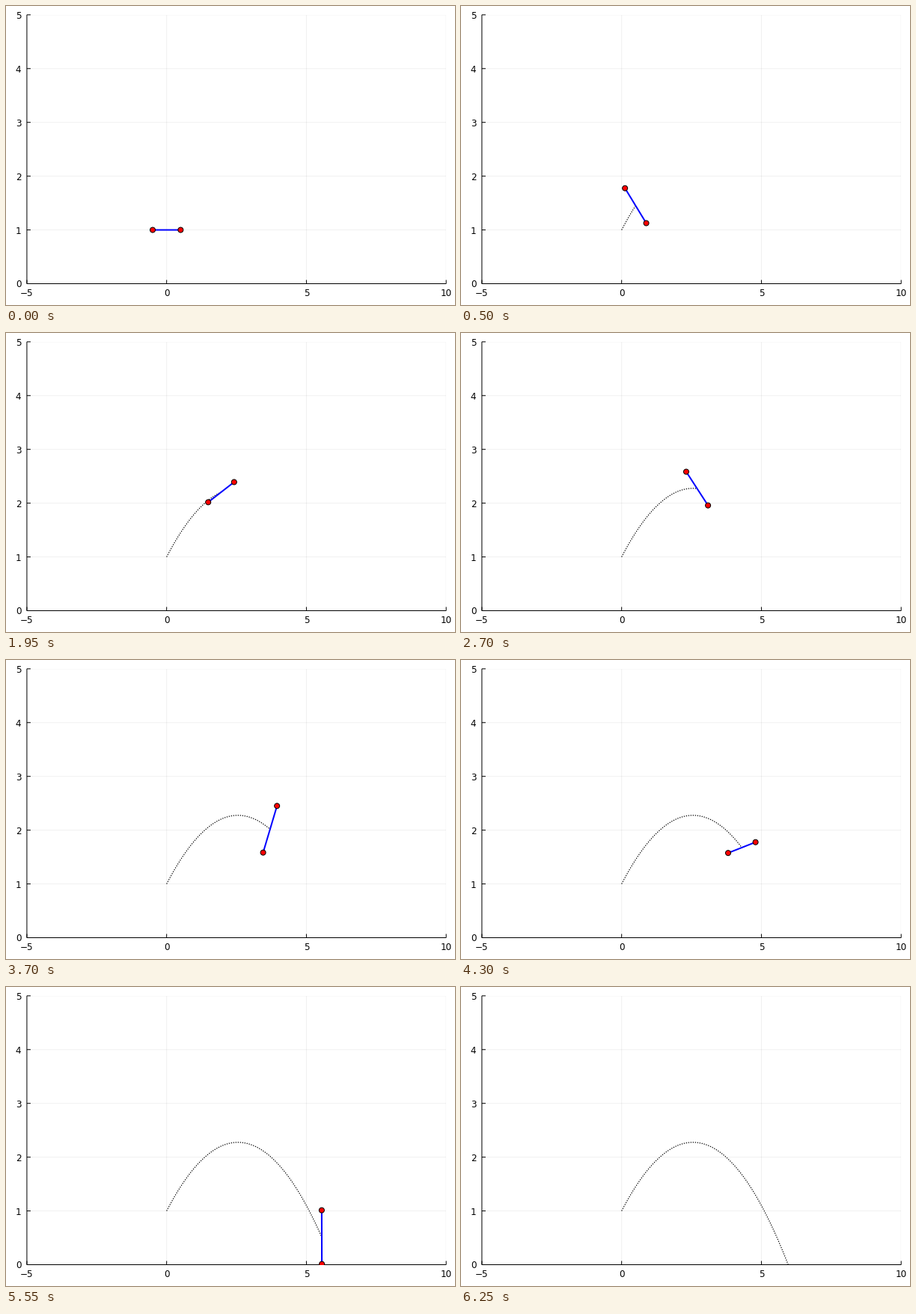
A matplotlib script for the animation above (8000 ms loop, 600 px wide and 400 px high).

```python
import numpy as np
import matplotlib.pyplot as plt
from matplotlib.animation import FuncAnimation
from matplotlib.patches import Ellipse

DPI = 100
W, H = 600, 400
PX = 72 / DPI                       # one pixel in points
LEFT, RIGHT, TOP, BASE = 27.9, 588.19, 11.81, 371.5
XMIN, XMAX, YMAX = -5, 10, 5
UX = (XMAX - XMIN) / (RIGHT - LEFT)  # data units per pixel
UY = YMAX / (BASE - TOP)
TICK = 5
BALL = 7                            # ball diameter inside its outline

FRAMES, INTERVAL = 160, 50
DT = 0.01                           # simulated seconds per frame
G = 9.8
VX, VY = 5.0, 5.0
Y0 = 1.0
SPIN = -5 * np.sqrt(2)              # rad/s, clockwise
HALF = 0.5                          # half the rod's length


def centre(t):
    return VX * t, Y0 + VY * t - G * t**2 / 2


def rod_ends(t):
    x, y = centre(t)
    dx, dy = HALF * np.cos(SPIN * t), HALF * np.sin(SPIN * t)
    return [x - dx, x + dx], [y - dy, y + dy]


def stroke(xs, ys, width=1, **style):
    """Line of a given pixel width, not snapped to the pixel grid."""
    line, = ax.plot(xs, ys, linewidth=width * PX, snap=False, **style)
    return line


def draw_axes():
    xticks, yticks = range(XMIN, XMAX + 1, 5), range(YMAX + 1)
    ax.set(xlim=(XMIN, XMAX), ylim=(0, YMAX), xticks=xticks, yticks=yticks)
    ax.spines[:].set_visible(False)
    ax.tick_params(length=0, labelsize=12 * PX, labelfontfamily="DejaVu Sans")
    ax.tick_params(axis="x", pad=6.3 * PX)
    ax.tick_params(axis="y", pad=7.5 * PX)

    grid = dict(color="black", alpha=0.06, zorder=1)
    frame = dict(color="black", clip_on=False, zorder=2,
                 solid_capstyle="butt")
    for x in xticks:
        stroke([x, x], [0, YMAX], **grid)
        stroke([x, x], [0, TICK * UY], **frame)
    for y in yticks:
        stroke([XMIN, XMAX], [y, y], **grid)
        stroke([XMIN, XMIN + TICK * UX], [y, y], **frame)
    stroke([XMIN, XMAX], [0, 0], **frame)
    stroke([XMIN, XMIN], [0, YMAX], **frame)


def make_ball():
    ball = Ellipse((0, 0), BALL * UX, BALL * UY, facecolor="red",
                   edgecolor="black", linewidth=PX, zorder=5)
    return ax.add_patch(ball)


fig = plt.figure(figsize=(W / DPI, H / DPI), dpi=DPI, facecolor="white")
ax = fig.add_axes([LEFT / W, 1 - BASE / H,
                   (RIGHT - LEFT) / W, (BASE - TOP) / H])
draw_axes()
trail = stroke([], [], 1.2, color="black", linestyle=(0, (1.1, 1.4)),
               dash_capstyle="butt", zorder=3)
rod = stroke([], [], 2, color="blue", zorder=4)
balls = [make_ball(), make_ball()]


def draw(i):
    trail.set_data(*centre(DT * np.arange(i + 1)))
    ends = rod_ends(DT * i)
    rod.set_data(*ends)
    for ball, end in zip(balls, zip(*ends)):
        ball.set_center(end)
    return trail, rod, *balls


anim = FuncAnimation(fig, draw, frames=FRAMES, interval=INTERVAL,
                     repeat=True, repeat_delay=0)
plt.show()
```
